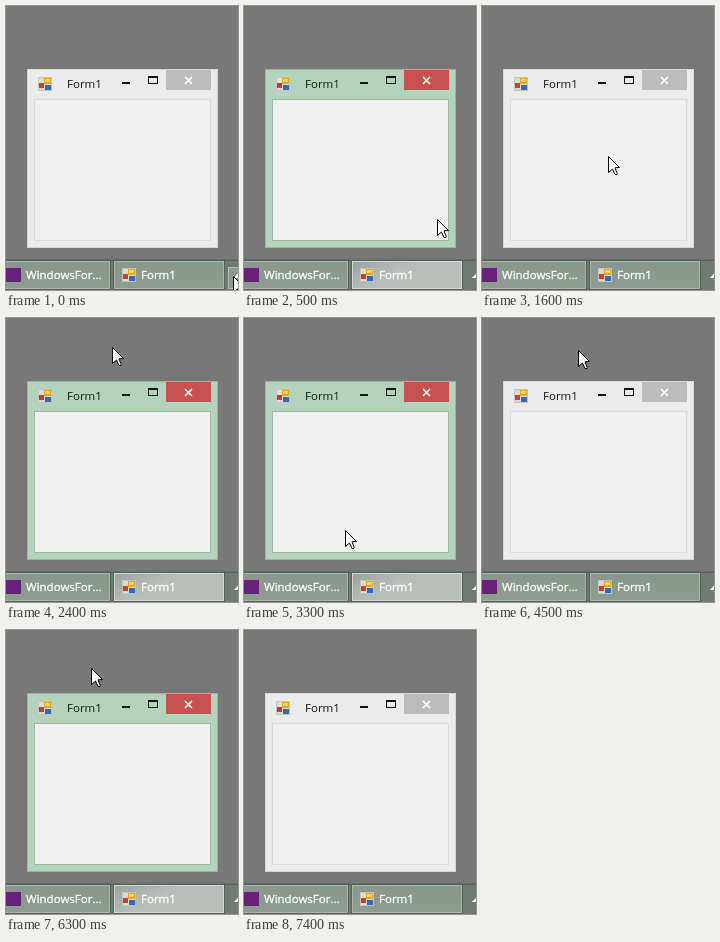
Write an HTML page with a canvas that moves like this. It is 232 by 284 pixels and loops after 8700 ms.

```html
<!DOCTYPE html>
<html lang="en">
<head>
<meta charset="utf-8">
<title>Window focus</title>
<style>
html, body { margin: 0; width: 232px; height: 284px; overflow: hidden; background: #787878; }
canvas { display: block; }
</style>
</head>
<body>
<canvas id="stage" width="232" height="284"></canvas>
<script>
const ctx = document.getElementById('stage').getContext('2d');
const LOOP = 8700, STEP = 100;
const FONT = '11.5px "Open Sans", "Noto Sans", sans-serif';

// Each click flips the focus of the window.
const clicks = [400, 1200, 1700, 2500, 3300, 4500, 5300, 6400];

// Pointer moves: first step, last step, end point, sideways bow.
const start = { x: 227, y: 270 };
const moves = [
  { from: 100, to: 200, x: 196, y: 224, bow: 0 },
  { from: 500, to: 1100, x: 140, y: 26, bow: 0 },
  { from: 1500, to: 1600, x: 126, y: 150, bow: 0 },
  { from: 2100, to: 2400, x: 106, y: 29, bow: 0 },
  { from: 2700, to: 3200, x: 101, y: 212, bow: 8 },
  { from: 3700, to: 4300, x: 96, y: 32, bow: 22.5 },
  { from: 4900, to: 5200, x: 104, y: 160, bow: 0 },
  { from: 5900, to: 6300, x: 85, y: 38, bow: 0 },
  { from: 6700, to: 6800, x: 92, y: 46, bow: 0 },
  { from: 7100, to: 7300, x: 164, y: 46, bow: 0 }
];
const HIDE = 7400;

function rect(x, y, w, h, fill) {
  ctx.fillStyle = fill;
  ctx.fillRect(x, y, w, h);
}

function frame(x, y, w, h, color) {
  ctx.strokeStyle = color;
  ctx.lineWidth = 1;
  ctx.strokeRect(x + 0.5, y + 0.5, w - 1, h - 1);
}

function label(text, x, y, color, weight = 0) {
  ctx.font = FONT;
  ctx.fillStyle = color;
  ctx.fillText(text, x, y);
  if (weight) {
    ctx.strokeStyle = color;
    ctx.lineWidth = weight;
    ctx.strokeText(text, x, y);
  }
}

function shade(x0, y0, x1, y1, a, b) {
  const g = ctx.createLinearGradient(x0, y0, x1, y1);
  g.addColorStop(0, a);
  g.addColorStop(1, b);
  return g;
}

function trace(points) {
  ctx.beginPath();
  points.forEach(([x, y]) => ctx.lineTo(x, y));
}

function line(points, color, width) {
  trace(points);
  ctx.strokeStyle = color;
  ctx.lineWidth = width;
  ctx.stroke();
}

function formIcon(x, y) {
  rect(x, y, 14, 14, '#dcdbd4');
  frame(x, y, 14, 14, '#c3c2bc');
  rect(x + 6, y + 1, 7, 6, '#e2a91f');
  rect(x + 7, y + 2, 5, 3, '#f7d461');
  rect(x + 1, y + 6, 5, 5, '#c8402f');
  rect(x + 7, y + 8, 6, 5, '#3468b8');
}

function drawWindow(active) {
  rect(21, 63, 191, 179, active ? '#b4d3bc' : '#ebebeb');
  frame(21, 63, 191, 179, active ? '#9ab7a2' : '#d6d6d6');
  rect(28, 93, 177, 142, '#f0f0f0');
  frame(28, 93, 177, 142, active ? '#9db9a5' : '#dadada');
  formIcon(32, 71);
  label('Form1', 61, 82, '#151515');

  rect(116, 76, 8, 2, '#111');
  frame(142, 70, 10, 8, '#111');
  rect(142, 70, 10, 2, '#111');

  rect(160, 64, 45, 20, active ? '#c75050' : '#bcbcbc');
  line([[179, 71], [186, 78]], '#fff', 1.6);
  line([[186, 71], [179, 78]], '#fff', 1.6);
}

function taskButton(x, w, lit) {
  frame(x - 1, 254, w + 2, 30, '#56605a');
  rect(x, 255, w, 28, lit
    ? shade(x, 255, x + 16, 283, '#9aa29d', '#b9beba')
    : shade(0, 255, 0, 283, '#89968c', '#8f9c92'));
  frame(x, 255, w, 28, lit ? '#d5d9d6' : '#a9b4ac');
}

function drawTaskbar(active, trayHover) {
  rect(0, 254, 232, 30, '#6f7a72');
  rect(0, 253, 232, 1, '#686c69');
  rect(0, 254, 232, 1, '#59615c');

  taskButton(-6, 110, false);
  rect(0, 262, 15, 14, '#68217a');
  label('WindowsFor...', 20, 273, '#fff', 0.3);

  taskButton(108, 110, active);
  formIcon(116, 262);
  label('Form1', 135, 273, '#fff', 0.3);

  if (trayHover) {
    rect(222, 261, 12, 22, '#8d9890');
    frame(222, 261, 12, 22, '#b3bcb6');
  }
  trace([[228, 272], [232, 267.5], [232, 272]]);
  ctx.fillStyle = '#fff';
  ctx.fill();
}

function drawPointer(x, y) {
  ctx.save();
  ctx.translate(x + 0.5, y + 0.5);
  trace([[0, 0], [0, 16], [4, 12.5], [6.5, 18], [8.5, 18], [8.7, 17], [6.5, 11.3], [11, 11]]);
  ctx.closePath();
  ctx.fillStyle = '#fff';
  ctx.fill();
  ctx.strokeStyle = '#000';
  ctx.lineWidth = 1;
  ctx.stroke();
  ctx.restore();
}

function pointerAt(t) {
  let p = start;
  for (const m of moves) {
    if (t < m.from) break;
    const count = (m.to - m.from) / STEP + 1;
    const k = Math.min(1, ((t - m.from) / STEP + 1) / count);
    const e = k * k * (3 - 2 * k);
    p = {
      x: Math.round(p.x + (m.x - p.x) * e + m.bow * Math.sin(Math.PI * e)),
      y: Math.round(p.y + (m.y - p.y) * e)
    };
  }
  return p;
}

function draw(now) {
  const t = Math.floor((now % LOOP) / STEP) * STEP;
  const active = clicks.filter(c => c <= t).length % 2 === 1;
  rect(0, 0, 232, 284, '#787878');
  drawWindow(active);
  drawTaskbar(active, t < 100);
  if (t < HIDE) {
    const p = pointerAt(t);
    drawPointer(p.x, p.y);
  }
}

const begin = performance.now();
function tick() {
  draw(performance.now() - begin);
  requestAnimationFrame(tick);
}
tick();
</script>
</body>
</html>
```
